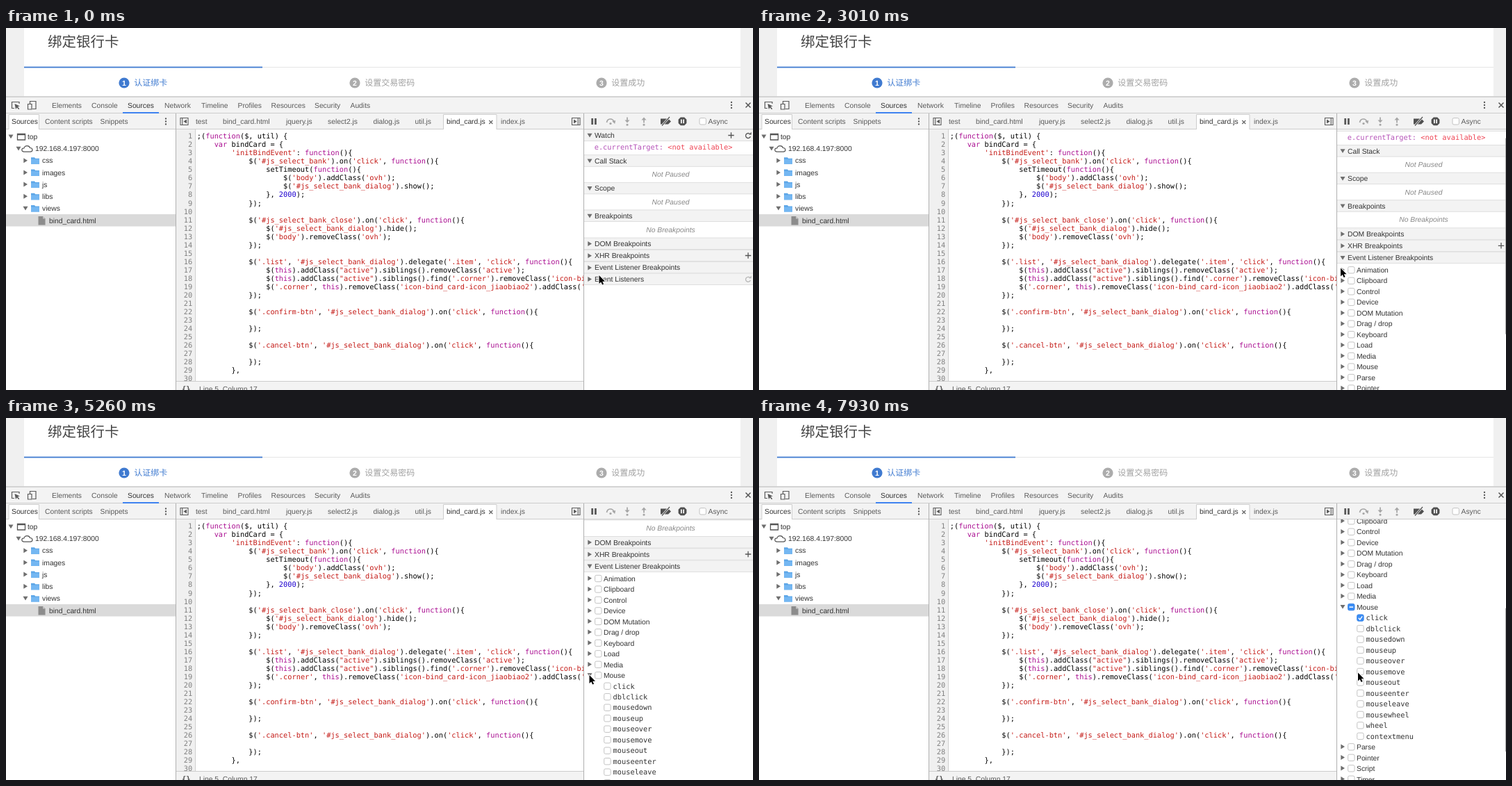
Write an HTML page with a canvas that moves like this. It is 1075 px wide and 521 px high and loops after 8 s.

```html
<!DOCTYPE html>
<html lang="zh">
<head>
<meta charset="utf-8">
<title>Event listener breakpoints</title>
<style>
  html, body { margin: 0; width: 100%; height: 100%; overflow: hidden; background: #fff; }
  canvas { display: block; width: 1075px; height: 521px; }
</style>
</head>
<body>
<canvas id="stage"></canvas>
<script>
const W = 1075, H = 521, LOOP = 8000;
const canvas = document.getElementById('stage');
const dpr = window.devicePixelRatio || 1;
canvas.width = W * dpr;
canvas.height = H * dpr;
let ctx = canvas.getContext('2d');

const SIZE = 10.32, CHAR = SIZE * 0.602, ROW = 15.48;
const SANS = '"Liberation Sans", Arial, sans-serif';
const MONO = '"DejaVu Sans Mono", monospace';
const CJK = '"Noto Sans CJK SC", "Noto Sans CJK", sans-serif';
const BAR = '#f3f3f3', EDGE = '#cdcdcd', INK = '#333', DIM = '#5a5a5a', BLUE = '#3f7ad0';

const CODE = `;(function($, util) {
    var bindCard = {
        'initBindEvent': function(){
            $('#js_select_bank').on('click', function(){
                setTimeout(function(){
                    $('body').addClass('ovh');
                    $('#js_select_bank_dialog').show();
                }, 2000);
            });

            $('#js_select_bank_close').on('click', function(){
                $('#js_select_bank_dialog').hide();
                $('body').removeClass('ovh');
            });

            $('.list', '#js_select_bank_dialog').delegate('.item', 'click', function(){
                $(this).addClass("active").siblings().removeClass('active');
                $(this).addClass("active").siblings().find('.corner').removeClass('icon-bind_card');
                $('.corner', this).removeClass('icon-bind_card-icon_jiaobiao2').addClass('icon');
            });

            $('.confirm-btn', '#js_select_bank_dialog').on('click', function(){

            });

            $('.cancel-btn', '#js_select_bank_dialog').on('click', function(){

            });
        },
`.split('\n');

const GROUPS = ['Animation', 'Clipboard', 'Control', 'Device', 'DOM Mutation', 'Drag / drop',
  'Keyboard', 'Load', 'Media', 'Mouse', 'Parse', 'Pointer', 'Script', 'Timer', 'Touch',
  'WebGL', 'Window', 'XHR'];
const MOUSE = ['click', 'dblclick', 'mousedown', 'mouseup', 'mouseover', 'mousemove',
  'mouseout', 'mouseenter', 'mouseleave', 'mousewheel', 'wheel', 'contextmenu'];

// Each move: first step, last step, step count, pointer x, pointer y, panel scroll
const START = [853.5, 356, 0];
const MOVES = [
  [450, 750, 3, 968, 366, 0],
  [910, 1210, 3, 805, 322, 0],
  [1370, 1370, 1, 835, 348, 0],
  [1520, 1520, 1, 833.5, 345.5, 0],
  [1820, 1970, 2, 833.5, 344.5, 0],
  [2410, 2410, 1, 837, 345.5, 0],
  [3010, 3010, 1, 837, 345.5, 14.2],
  [3160, 3610, 4, 837, 345.5, 131.5],
  [4060, 4960, 7, 839.5, 370, 131.5],
  [5710, 6000, 3, 839.5, 370, 153.8],
  [6150, 6580, 4, 862, 366.5, 153.8],
  [7630, 7930, 3, 862, 366.5, 229.7]
];

function poseAt(t) {
  let pose = START;
  for (const [from, to, steps, ...goal] of MOVES) {
    if (t < from) break;
    const gap = (to - from) / Math.max(1, steps - 1);
    const done = gap ? Math.min(steps, Math.floor((t - from) / gap + 1e-6) + 1) : 1;
    const k = 1 - (1 - done / steps) ** 2;
    pose = pose.map((v, i) => v + (goal[i] - v) * k);
  }
  return pose;
}

function rect(x, y, w, h, color) {
  ctx.fillStyle = color;
  ctx.fillRect(x, y, w, h);
}

function text(s, x, mid, color = INK, font = SANS, size = SIZE, style = '') {
  ctx.font = `${style} ${size}px ${font}`;
  ctx.fillStyle = color;
  ctx.fillText(s, x, mid + size * 0.36);
}

function poly(points, color) {
  ctx.fillStyle = color;
  ctx.beginPath();
  points.forEach(([x, y]) => ctx.lineTo(x, y));
  ctx.closePath();
  ctx.fill();
}

function path(d, color, width = 1.2) {
  ctx.strokeStyle = color;
  ctx.lineWidth = width;
  ctx.stroke(new Path2D(d));
}

function disc(x, y, r, color) {
  ctx.fillStyle = color;
  ctx.beginPath();
  ctx.arc(x, y, r, 0, 7);
  ctx.fill();
}

function fold(x, y, open, color = '#6e6e6e') {
  poly(open ? [[x - 3.5, y - 2.8], [x + 3.5, y - 2.8], [x, y + 3]]
            : [[x - 2.7, y - 3.5], [x + 3, y], [x - 2.7, y + 3.5]], color);
}

function plus(x, y) {
  path(`M${x - 4.2} ${y}h8.4M${x} ${y - 4.2}v8.4`, '#555', 1.3);
}

function reload(x, y, color) {
  ctx.strokeStyle = color;
  ctx.lineWidth = 1.3;
  ctx.beginPath();
  ctx.arc(x, y + 0.5, 3.5, 0.3, 5.3);
  ctx.stroke();
  poly([[x + 0.8, y - 1], [x + 4.6, y - 1], [x + 4.6, y - 4.8]], color);
}

function dots(x, y) {
  for (const d of [-4, 0, 4]) disc(x, y + d, 1.15, '#555');
}

function check(x, y, state = '') {
  ctx.beginPath();
  ctx.roundRect(x - 4.7, y - 4.7, 9.4, 9.4, 2);
  ctx.fillStyle = state ? '#3b8df5' : '#fff';
  ctx.fill();
  ctx.strokeStyle = state ? '#3380e6' : '#bdbdbd';
  ctx.lineWidth = 0.9;
  ctx.stroke();
  if (state === 'on') path(`M${x - 2.6} ${y + 0.2}l2 2.3l3.4 -4.8`, '#fff', 1.4);
  if (state === 'some') path(`M${x - 2.8} ${y}h5.6`, '#fff', 1.5);
}

function drawPage() {
  rect(0, 0, W, 99, '#f0f0f0');
  rect(26, 0, 1031, 98, '#fff');
  rect(369, 56, 688, 1, '#e6e6e6');
  rect(26, 55.6, 343, 1.8, BLUE);
  text('绑定银行卡', 60, 20, '#444', CJK, 20.5);
  [['认证绑卡', 170], ['设置交易密码', 502], ['设置成功', 857]].forEach(([label, x], i) => {
    disc(x, 79, 7.6, i ? '#acacac' : BLUE);
    text(i + 1, x - 3, 79, '#fff', SANS, 10.5, 'bold');
    text(label, x + 14.3, 78.8, i ? '#a0a0a0' : BLUE, CJK, 12);
  });
}

function drawTabs() {
  rect(0, 98.5, W, 47.5, BAR);
  rect(0, 98.5, W, 1, '#b5b5b5');
  rect(0, 122, W, 1, EDGE);
  rect(0, 145, W, 1, EDGE);
  const tabs = { Elements: 66, Console: 123, Sources: 175, Network: 228, Timeline: 281,
    Profiles: 333.5, Resources: 381.5, Security: 444, Audits: 495.5 };
  for (const s in tabs) text(s, tabs[s], 111, s === 'Sources' ? INK : DIM);
  rect(168, 121, 52, 2, '#3e82f0');

  path('M19 109V106.500H8.500V115.500H12', DIM);
  poly([[12.5, 109], [19.8, 112.6], [16.8, 113.3], [19.3, 116.2], [18.2, 117.2], [15.7, 114.4], [14, 117]], DIM);
  path('M34.500 109V105.500H43V116.500H38', DIM);
  path('M31.500 109.500H37V117H31.500Z', DIM);
  dots(1044, 111);
  path('M1064.500 107.500l7 7m0 -7l-7 7', '#555', 1.5);

  rect(4, 124, 43.5, 22, '#fff');
  path('M4 146V124.500H47.500V146', EDGE, 1);
  text('Sources', 8, 134.7);
  text('Content scripts', 56, 134.7, DIM);
  text('Snippets', 135.5, 134.7, DIM);
  dots(230, 134.5);

  rect(629, 124, 77, 22, '#fff');
  path('M629.500 146V124.500H706V146', EDGE, 1);
  const files = { test: 273, 'bind_card.html': 312, 'jquery.js': 403, 'select2.js': 463,
    'dialog.js': 528.5, 'util.js': 588.5, 'bind_card.js': 634, 'index.js': 712 };
  for (const s in files) text(s, files[s], 134.7, s === 'bind_card.js' ? INK : DIM);
  path('M695.300 133l5 5m0 -5l-5 5', '#666', 1.2);

  path('M251 129.500H262V139.500H251ZM253.800 129.500V139.500', DIM, 1.1);
  poly([[260, 131.5], [255.5, 134.5], [260, 137.5]], DIM);
  path('M814.500 129.500H826V139.500H814.500ZM823.200 129.500V139.500', DIM, 1.1);
  poly([[817, 131.5], [821.5, 134.5], [817, 137.5]], DIM);
}

function drawDebugBar() {
  const gray = '#a5a5a5';
  rect(842.3, 130, 2.8, 9, DIM);
  rect(847, 130, 2.8, 9, DIM);
  path('M864.500 136C865.500 129.500 873 129.500 875 135', gray, 1.7);
  poly([[872.3, 134.2], [877.2, 133], [876.2, 138]], gray);
  disc(870, 137.5, 1.6, gray);
  for (const [x, dir] of [[894, 1], [918, -1]]) {
    const y = dir > 0 ? 128.5 : 136.5;
    path(`M${x} ${y}v${6 * dir}`, gray, 1.7);
    poly([[x - 3.5, y + 4 * dir], [x + 3.5, y + 4 * dir], [x, y + 8 * dir]], gray);
    disc(x, 139.2, 1.5, gray);
  }
  poly([[942, 130.5], [953, 130.5], [957, 134.5], [953, 138.5], [942, 138.5]], '#505050');
  path('M944 140.500L955 128', BAR, 2.8);
  path('M944 140.500L955 128', '#505050', 1.2);
  poly([[970.8, 128.5], [976.2, 128.5], [979.4, 131.7], [979.4, 137], [976.2, 140.2],
    [970.8, 140.2], [967.6, 137], [967.6, 131.7]], '#505050');
  rect(971, 131.5, 1.7, 5.7, '#fff');
  rect(974.3, 131.5, 1.7, 5.7, '#fff');
  check(1002.7, 134.3);
  text('Async', 1010.5, 134.5, DIM);
}

function drawTree() {
  rect(0, 146, 244, H - 146, '#fff');
  rect(0, 268, 244, 17.5, '#dadada');
  const y = i => 156.3 + i * 17.2;
  fold(7, y(0), true);
  path('M16.500 152.500H27.500V161H16.500ZM16.500 153.500H27.500', '#555', 1.3);
  text('top', 31, y(0));
  fold(18, y(1), true);
  path('M26 178.200C21.500 178 22 172.500 26 172.800C27 168.500 33.500 168.500 34.500 172.500C39 172.500 39 178 35 178.200Z', '#555', 1.2);
  text('192.168.4.197:8000', 42, y(1));
  ['css', 'images', 'js', 'libs', 'views'].forEach((name, i) => {
    const mid = y(i + 2);
    fold(28, mid, i === 4);
    poly([[36, mid - 4.5], [41, mid - 4.5], [42.3, mid - 3], [48, mid - 3], [48, mid + 5], [36, mid + 5]], '#5ea7e8');
    rect(36, mid - 1.8, 12, 6.8, '#74b7f2');
    text(name, 52, mid);
  });
  poly([[46.5, 271], [53, 271], [56.5, 274.5], [56.5, 283.5], [46.5, 283.5]], '#8c8c8c');
  poly([[53, 271], [56.5, 274.5], [53, 274.5]], '#c4c4c4');
  text('bind_card.html', 62, y(7) + 0.2);
  rect(244, 123, 1, H - 123, '#b0b0b0');
}

function drawCode() {
  rect(245, 146, 586, H - 146, '#fff');
  rect(245, 146, 27, H - 146, '#f0f0f0');
  rect(272, 146, 1, H - 146, '#cfcfcf');
  const tokens = /('[^']*'|"[^"]*")|\b(function|var|this)\b|\b(\d+)\b|[^'"\s\w]+|\w+/g;
  ctx.save();
  ctx.beginPath();
  ctx.rect(245, 146, 586, 362);
  ctx.clip();
  CODE.forEach((line, i) => {
    const mid = 155.5 + i * 12.04;
    const no = String(i + 1);
    text(no, 268.3 - no.length * CHAR, mid, '#808080', MONO);
    for (const m of line.matchAll(tokens)) {
      const color = m[1] ? '#c41a16' : m[2] ? '#aa0d91' : m[3] ? '#1c00cf' : '#000';
      text(m[0], 274.8 + m.index * CHAR, mid, color, MONO);
    }
  });
  ctx.restore();
  rect(245, 508, 586, 13, BAR);
  rect(245, 508, 586, 1, EDGE);
  text('{}', 253, 519, '#505050', MONO, SIZE, 'bold');
  text('Line 5, Column 17', 278, 519.5, DIM);
}

function header(title, mid, open) {
  rect(832, mid - 8.5, 243, 17, BAR);
  rect(832, mid - 8.7, 243, 0.9, '#dcdcdc');
  rect(832, mid + 7.8, 243, 0.9, '#dcdcdc');
  fold(840, mid + 0.3, open);
  text(title, 847, mid);
}

function empty(s, mid) {
  ctx.textAlign = 'center';
  text(s, 956.5, mid, '#888', SANS, SIZE, 'italic');
  ctx.textAlign = 'left';
}

function drawPanel(t, scroll) {
  const open = t >= 2410, mouse = t >= 5260, picked = t >= 6730;
  rect(832, 146, 243, H - 146, '#fff');
  ctx.save();
  ctx.beginPath();
  ctx.rect(832, 146, 243, H - 146);
  ctx.clip();
  ctx.translate(0, -scroll);

  header('Watch', 154.3, true);
  plus(1043.5, 154.5);
  reload(1068, 154.5, '#555');
  text('e.currentTarget:', 846.7, 171, '#b552b8', MONO);
  text('<not available>', 846.7 + 17 * CHAR, 171, '#ee4454', MONO);
  header('Call Stack', 191, true);
  empty('Not Paused', 210.5);
  header('Scope', 230.6, true);
  empty('Not Paused', 250.2);
  header('Breakpoints', 270.2, true);
  empty('No Breakpoints', 289.8);
  header('DOM Breakpoints', 310.3, false);
  header('XHR Breakpoints', 327.5, false);
  plus(1068, 327.5);
  header('Event Listener Breakpoints', 344.6, open);

  let y = 362.5;
  if (open) {
    for (const name of GROUPS) {
      const expanded = mouse && name === 'Mouse';
      fold(840, y - 0.3, expanded);
      check(852.3, y, expanded && picked ? 'some' : '');
      text(name, 860, y);
      y += ROW;
      if (!expanded) continue;
      for (const event of MOUSE) {
        check(865.4, y, picked && event === 'click' ? 'on' : '');
        text(event, 873.6, y, INK, MONO);
        y += ROW;
      }
    }
  }
  const last = open ? y + 11.8 : 361.3;
  header('Event Listeners', last, false);
  reload(1068, last, '#b5b5b5');
  ctx.restore();

  const moving = (t >= 3010 && t < 4060) || (t >= 5710 && t < 6430) || t >= 7630;
  if (moving) {
    const view = 384, full = last + 8.6 - 146;
    const size = view * view / full;
    rect(1074, 148 + scroll * view / full, 1, size - 4, '#a8a8a8');
  }
}

function drawPointer(x, y) {
  const shape = [[0, 0], [0, 12], [2.7, 9.5], [4.6, 13.6], [6.6, 12.7], [4.8, 8.7], [8.5, 8.7]]
    .map(([a, b]) => [x + a, y + b]);
  ctx.lineJoin = 'round';
  path('M' + shape.join('L') + 'Z', '#fff', 1.8);
  ctx.lineJoin = 'miter';
  poly(shape, '#000');
}

function prepare(context) {
  context.setTransform(dpr, 0, 0, dpr, 0, 0);
  context.textRendering = 'geometricPrecision';
}

// The still parts are painted once and reused.
const still = document.createElement('canvas');
still.width = canvas.width;
still.height = canvas.height;
const screen2d = ctx;
ctx = still.getContext('2d');
prepare(ctx);
rect(0, 0, W, H, '#fff');
drawPage();
drawTabs();
drawDebugBar();
drawTree();
drawCode();
rect(831, 123, 1, H - 123, '#b0b0b0');
ctx = screen2d;
prepare(ctx);

const begin = performance.now();
function frame() {
  const t = (performance.now() - begin) % LOOP;
  const [x, y, scroll] = poseAt(t);
  ctx.drawImage(still, 0, 0, W, H);
  drawPanel(t, scroll);
  drawPointer(x, y);
  requestAnimationFrame(frame);
}
frame();
</script>
</body>
</html>
```
